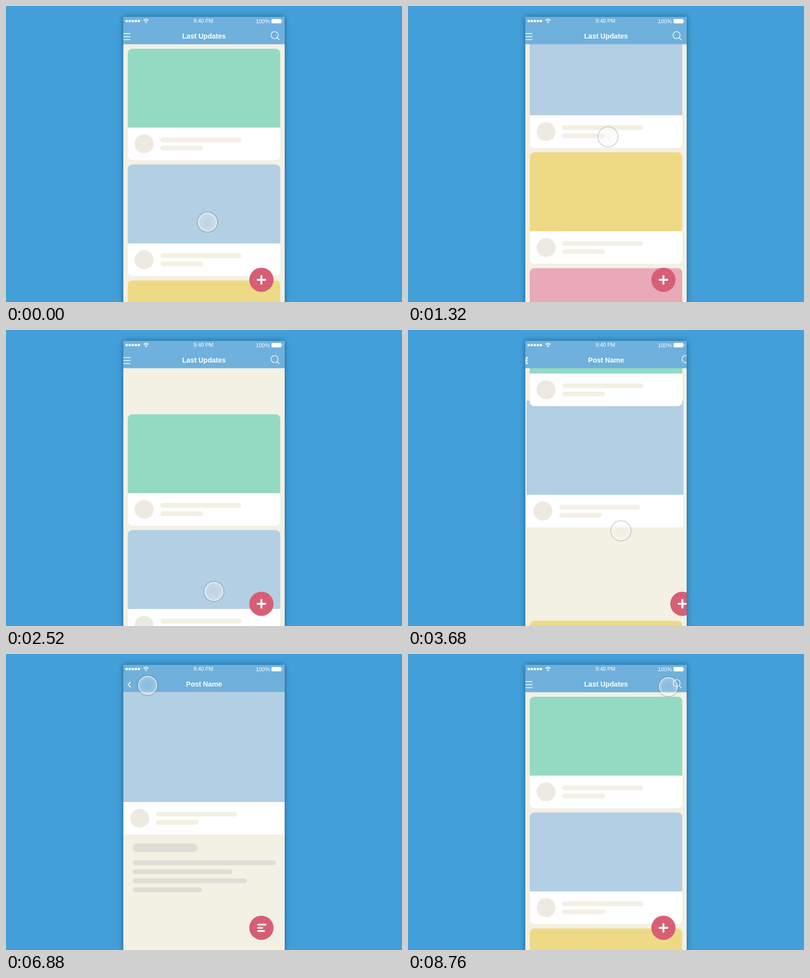
An HTML page with a canvas for the animation above (8800 ms loop, 800x600 px).

```html
<!DOCTYPE html>
<html lang="en">
<head>
<meta charset="utf-8">
<title>Last Updates</title>
<style>
  html, body { margin: 0; width: 100%; height: 100%; overflow: hidden; background: #429fd9; }
  canvas { display: block; }
</style>
</head>
<body>
<canvas id="stage" width="800" height="600"></canvas>
<script>
const ctx = document.getElementById('stage').getContext('2d');
const LOOP = 8800;
const FONT = '"Liberation Sans", Arial, sans-serif';
const CREAM = '#f3f0e4', RED = '#d75f75', WHITE = '#fff';
const CARDS = ['#94dac2', '#b3cfe4', '#eeda85', '#e9a9b9'];
const TOP = 86.4, PITCH = 234.9;
const OPEN = 3440, BACK = 7520, SLIDE = 480;

// Easing
const clamp = v => Math.max(0, Math.min(1, v));
const seg = (t, a, b) => clamp((t - a) / (b - a));
const mix = (a, b, p) => a + (b - a) * p;
const inOut = p => p < .5 ? 2 * p * p : 1 - 2 * (1 - p) * (1 - p);
const out = n => p => 1 - Math.pow(1 - p, n);
function glide(x) { // cubic-bezier(.4, 0, .2, 1)
  let lo = 0, hi = 1, u = x;
  for (let i = 0; i < 18; i++) {
    u = (lo + hi) / 2;
    const bx = 1.2 * u * (1 - u) * (1 - u) + .6 * u * u * (1 - u) + u * u * u;
    if (bx < x) lo = u; else hi = u;
  }
  return 3 * u * u * (1 - u) + u * u * u;
}
function spring(t, start) {
  const s = Math.max(0, t - start) / 1000;
  return 1 - Math.exp(-4.7 * s) * Math.cos(22.4 * s);
}
// Each key: [time, value, easing towards it]
function track(t, keys) {
  for (let i = 1; i < keys.length; i++) {
    const [b, v, ease = glide] = keys[i], [a, u] = keys[i - 1];
    if (t < b) return mix(u, v, ease(seg(t, a, b)));
  }
  return keys[keys.length - 1][1];
}
// 0 in the list, 1 in the post
const opened = (t, ease) => ease(seg(t, OPEN, OPEN + SLIDE)) - ease(seg(t, BACK, BACK + SLIDE));

const SCROLL = [[0, 0], [1150, 260], [1300, 260], [2350, -85], [2520, -85], [2770, 0, out(2)]];
const CURSOR_X = [[0, 407], [1150, 404], [1300, 404], [2350, 420], [2560, 420], [3360, 430], [3760, 430],
  [4640, 515], [5600, 514], [6440, 515], [7130, 262], [8360, 262], [8760, 526]];
const CURSOR_Y = [[0, 438], [1150, 265], [1300, 265], [2350, 530], [2560, 530], [3360, 407], [3760, 407],
  [4640, 548], [5600, 548], [6440, 553], [6900, 63], [8360, 63], [8760, 66]];

// Shapes
function box(x, y, w, h, r, color) {
  ctx.fillStyle = color;
  ctx.beginPath();
  ctx.roundRect(x, y, w, h, r);
  ctx.fill();
}
function disc(x, y, r, color) {
  ctx.fillStyle = color;
  ctx.beginPath();
  ctx.arc(x, y, r, 0, 7);
  ctx.fill();
}
function stroke(width, ...points) {
  ctx.strokeStyle = WHITE;
  ctx.lineWidth = width;
  ctx.beginPath();
  points.forEach(([x, y], i) => i ? ctx.lineTo(x, y) : ctx.moveTo(x, y));
  ctx.stroke();
}
function text(str, x, y, font, align = 'center') {
  ctx.font = font + ' ' + FONT;
  ctx.textAlign = align;
  ctx.fillStyle = WHITE;
  ctx.fillText(str, x, y);
}

function card(x, y, w, imageH, r, color) {
  box(x, y, w, imageH + 66, r, WHITE);
  box(x, y, w, imageH, [r, r, 0, 0], color);
  const base = y + imageH;
  disc(x + 33, base + 33, 19.2, '#eeeae2');
  box(x + 66, base + 20, 163.5, 9.6, 4.8, CREAM);
  box(x + 66, base + 36.6, 86, 9.6, 4.8, CREAM);
}

function list(t) {
  const scroll = track(t, SCROLL);
  const pos = opened(t, out(1.9)), size = opened(t, inOut), lift = opened(t, out(1.58));
  const y = i => TOP + i * PITCH - scroll;
  card(246 - 9 * pos, y(1) - 243.3 * pos, 308 + 18 * size, 160 + 62 * size, 9 * (1 - pos), CARDS[1]);
  card(246, y(0) - 237 * lift, 308, 160, 9, CARDS[0]);
  for (const i of [2, 3]) card(246, y(i) + 45 * pos, 308, 160, 9, CARDS[i]);
}

function article(t) {
  const rows = [[384, 131.5, 17.5], [418.5, 289.5, 9.6], [436.7, 201, 9.6], [455, 230.5, 9.6], [473.3, 140, 9.6]];
  rows.forEach(([y, w, h], i) => {
    const start = 3880 + i * 60;
    const p = out(2)(seg(t, start, start + 320)) * (1 - seg(t, BACK, BACK + 160));
    if (p <= 0) return;
    ctx.globalAlpha = p;
    box(256, y + 18 * (1 - p), w, h, h / 2, '#dfddd5');
  });
  ctx.globalAlpha = 1;
}

function statusBar() {
  for (let i = 0; i < 5; i++) disc(243.8 + i * 6.15, 30.6, 2.5, WHITE);
  ctx.lineCap = 'butt';
  ctx.strokeStyle = WHITE;
  ctx.lineWidth = 1.5;
  for (const r of [7.2, 4.5]) {
    ctx.beginPath();
    ctx.arc(282.8, 34, r, -Math.PI * .76, -Math.PI * .24);
    ctx.stroke();
  }
  disc(282.8, 33.2, 1.5, WHITE);
  text('9:40 PM', 398.8, 34.3, '10.6px');
  text('100%', 533, 35, '11px', 'right');
  box(536.3, 26.2, 19.8, 9, 1.6, WHITE);
  box(556.8, 29, 1.3, 3.4, .6, WHITE);
}

function header(t) {
  box(237, 22, 326, 55.6, 0, '#6fb1dc');
  statusBar();
  const swap = seg(t, OPEN, OPEN + 120) - seg(t, BACK, BACK + 120);
  ctx.globalAlpha = 1 - swap;
  text('Last Updates', 400, 66, 'bold 14px');
  ctx.globalAlpha = swap;
  text('Post Name', 400, 66, 'bold 14px');
  ctx.globalAlpha = 1;

  const p = opened(t, inOut);
  for (const y of [55.8, 62, 68.2]) stroke(1.5, [237 - 18 * p, y], [251.2 - 18 * p, y]);
  const x = 228 + 21 * p;
  if (p > 0) stroke(1.7, [x + 3, 56.8], [x - 2.5, 62.2], [x + 3, 67.6]);

  const s = 36 * p;
  ctx.lineWidth = 1.3;
  ctx.beginPath();
  ctx.arc(542.6 + s, 59, 7.1, 0, 7);
  ctx.stroke();
  stroke(1.4, [547.7 + s, 64.1], [552.4 + s, 68.9]);
}

function actionButton(t) {
  const shift = 76 * (inOut(seg(t, OPEN, OPEN + SLIDE)) - out(3)(seg(t, 3980, 4400))
    + inOut(seg(t, BACK, BACK + SLIDE)) - out(3)(seg(t, 8030, 8400)));
  const x = 516 + shift, y = 555;
  const close = start => inOut(seg(t, start, start + 300));

  const petals = [[10, -76, '#dd7b8b'], [-54.3, -55, '#e6989f'], [-76.5, 9.2, '#eab9bb']];
  petals.map((petal, i) => [...petal, spring(t, 4749 + 84 * i) * (1 - close(5760 + 60 * i))])
    .reverse()
    .forEach(([dx, dy, color, s]) => { if (s > 0) disc(x + dx * s, y + dy * s, 24.5, color); });

  disc(x, y, 24.5 + 7 * spring(t, 4700) * (1 - close(5760)), RED);

  ctx.lineCap = 'round';
  const inPost = t > 3960 && t < 8010;
  if (!inPost) {
    stroke(4, [x - 7.7, y], [x + 7.7, y]);
    stroke(4, [x, y - 7.7], [x, y + 7.7]);
  } else {
    // Three lines folding into a cross
    const m = inOut(seg(t, 4720, 4920)) - inOut(seg(t, 5760, 5960));
    const w = mix(3.5, 4, m), left = mix(-6.8, -5.7, m);
    stroke(w, [x + left, y + mix(-6.4, -5.7, m)], [x + mix(8.4, 5.7, m), y + mix(-6.4, 5.7, m)]);
    stroke(w, [x + left, y + mix(6.4, 5.7, m)], [x + mix(5.4, 5.7, m), y + mix(6.4, -5.7, m)]);
    if (m < 1) {
      ctx.globalAlpha = 1 - m;
      stroke(w, [x - 6.8, y], [x + 1.6, y]);
      ctx.globalAlpha = 1;
    }
  }
  ctx.lineCap = 'butt';
}

function cursor(t) {
  const x = track(t, CURSOR_X), y = track(t, CURSOR_Y);
  const glow = ctx.createRadialGradient(x, y, 4, x, y, 19);
  glow.addColorStop(0, 'rgba(238,228,226,.24)');
  glow.addColorStop(.7, 'rgba(248,244,243,.28)');
  glow.addColorStop(1, 'rgba(255,255,255,.5)');
  disc(x, y, 19, glow);
  const ring = (r, w, color) => {
    ctx.strokeStyle = color;
    ctx.lineWidth = w;
    ctx.beginPath();
    ctx.arc(x, y, r, 0, 7);
    ctx.stroke();
  };
  ring(20.4, 2.6, 'rgba(60,70,85,.12)');
  ring(20, 1.2, 'rgba(60,70,85,.18)');
  ring(18.7, 1.5, 'rgba(255,255,255,.6)');
}

function draw(t) {
  ctx.fillStyle = '#429fd9';
  ctx.fillRect(0, 0, 800, 600);
  ctx.save();
  ctx.shadowColor = 'rgba(0,30,60,.5)';
  ctx.shadowBlur = 11;
  box(237, 22, 326, 620, 0, CREAM);
  ctx.restore();

  ctx.save();
  ctx.beginPath();
  ctx.rect(237, 22, 326, 578);
  ctx.clip();
  list(t);
  article(t);
  header(t);
  actionButton(t);
  ctx.restore();
  cursor(t);
}

const begin = performance.now();
function frame() {
  draw((performance.now() - begin) % LOOP);
  requestAnimationFrame(frame);
}
frame();
</script>
</body>
</html>
```
